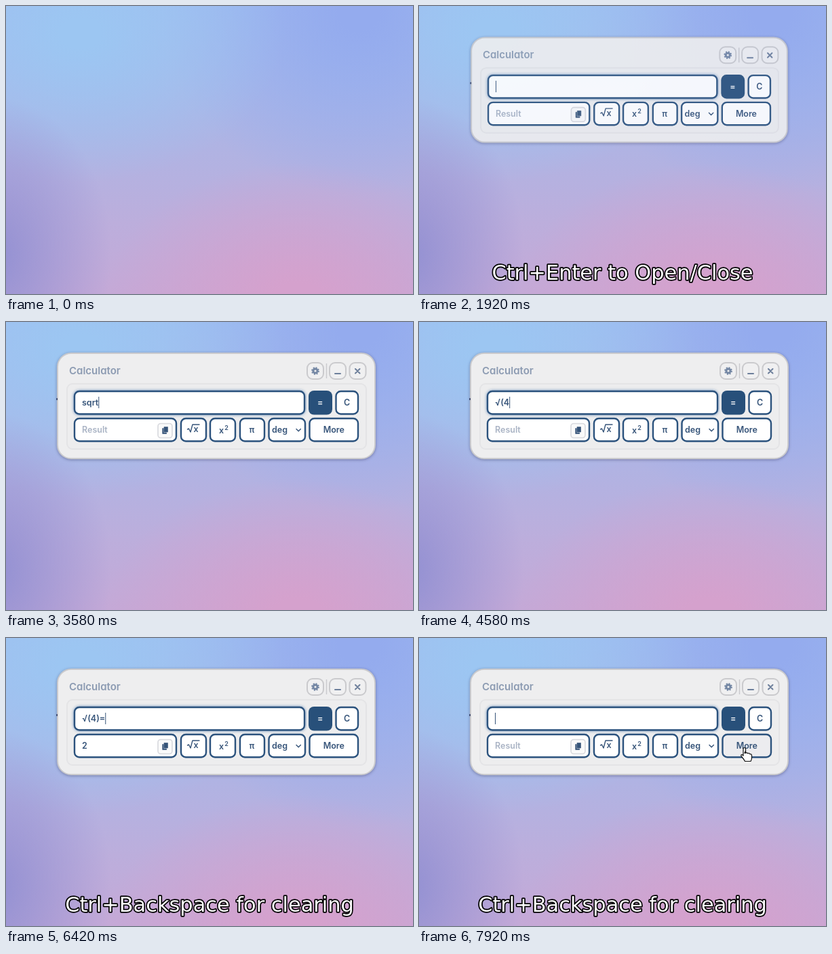
An HTML page that plays this animation: 600 px wide and 424 px high, repeating every 8000 ms.

```html
<!DOCTYPE html>
<html lang="en">
<head>
<meta charset="utf-8">
<title>Calculator</title>
<style>
html, body { margin: 0; width: 100%; height: 100%; overflow: hidden; }
body {
  background:
    radial-gradient(ellipse 290px 210px at 430px 440px, #d5a1cd 15%, #d5a1cd00),
    radial-gradient(ellipse 170px 230px at -15px 365px, #9793d3 10%, #9793d300),
    radial-gradient(ellipse 300px 220px at 110px 40px, #9cc6f2 10%, #9cc6f200),
    radial-gradient(ellipse 290px 270px at 520px 10px, #94abee 10%, #94abee00),
    linear-gradient(#a0bcef, #aeb4e4 45%, #bcaedc 75%, #c4a9d7);
}
svg { display: block; width: 100%; height: 100%; }
text { font-family: Inter, "Open Sans", sans-serif; font-feature-settings: "cv11"; font-weight: 600; font-size: 12.5px; fill: #365479; }
.mid { text-anchor: middle; }
.caption { font: 30.4px "DejaVu Sans", sans-serif; fill: #fff; stroke: #000; stroke-width: 3.4px; stroke-linejoin: round; paint-order: stroke; text-anchor: middle; }
.icon { fill: none; stroke: #6d7f9b; stroke-width: 2; stroke-linecap: round; stroke-linejoin: round; }
.dark { stroke: #365479; stroke-width: 1.4; }
#panel { transform-origin: 310px 123px; }
#frame { filter: drop-shadow(0 1px 2px rgba(50, 50, 90, .45)); }
#field { filter: drop-shadow(0 0 2px rgba(60, 110, 170, .75)); }
</style>
</head>
<body>
<svg id="stage" viewBox="0 0 600 424" preserveAspectRatio="none"></svg>
<script>
const LOOP = 8000, BLINK = 1060;
const NAVY = '#2b527d', EDGE = '#cacacd';

const box = (x, y, w, h, r, fill, stroke = 'none', width = 2, id = '') =>
  `<rect id="${id}" x="${x}" y="${y}" width="${w}" height="${h}" rx="${r}" fill="${fill}" stroke="${stroke}" stroke-width="${width}"/>`;
const label = (x, y, text, attrs = 'class="mid"') => `<text x="${x}" y="${y}" ${attrs}>${text}</text>`;
const icon = (d, cls = '') => `<path class="icon ${cls}" d="${d}"/>`;

const keys = [
  { id: 'root', x: 258, w: 37 },
  { id: 'square', x: 301, w: 37 },
  { id: 'pi', x: 345, w: 36 },
  { id: 'unit', x: 387.5, w: 53.5 },
  { id: 'more', x: 447.5, w: 71.5 }
];

stage.innerHTML = `
<g id="panel">
  <g id="frame">${box(76, 46, 468, 155, 20, '#eeeeef', EDGE)}</g>
  ${box(90, 91, 441, 96, 8, '#ededee', '#e4e4e6')}
  <rect x="74" y="112" width="2" height="3" fill="#4b587b"/>
  ${label(93, 76.5, 'Calculator', 'style="font-size:15px;fill:#8c9bb2"')}
  ${[444, 477, 506.5].map(x => box(x, 60, 24, 24, 8, '#f0f0f1', EDGE)).join('')}
  <path d="M472.5 61V83" stroke="${EDGE}" stroke-width="1.5"/>
  <circle cx="456" cy="72" r="3.1" fill="none" stroke="#7487a4" stroke-width="3"/>
  <circle cx="456" cy="72" r="5" fill="none" stroke="#7487a4" stroke-width="1.8" stroke-dasharray="2 1.927"/>
  ${icon('M485 76H493')}${icon('M515 69l6.5 6.5M521.5 69l-6.5 6.5')}
  ${box(101, 102, 339, 33.5, 7, '#fff', NAVY, 2.4, 'field')}
  ${label(112, 122.5, '', 'id="entry" xml:space="preserve"')}
  <rect id="caret" y="110" width="1" height="17" fill="#365479"/>
  ${box(446, 101, 35, 35.5, 8, '#28507a')}
  ${label(463.3, 123, '=', 'class="mid" style="fill:#fff"')}
  ${box(486.5, 102, 32.5, 33.5, 7, '#fff', NAVY, 2.4)}
  ${label(502.7, 123, 'C')}
  ${box(101, 142, 150, 33.5, 7, '#fff', NAVY, 2.4)}
  ${label(112, 163, '', 'id="result"')}
  ${box(224, 149.5, 21, 21, 4, '#fafafa', '#d8d9de', 1.6)}
  <path d="M233 154.5h5.5v7.5h-5.5zM230.7 156.500h1.500v6.500h4.500v1.500h-6z" fill="#365479" stroke="#365479" stroke-width=".6"/>
  ${keys.map(k => box(k.x, 142, k.w, 33.5, 7, '#fff', NAVY, 2.4, k.id)).join('')}
  ${icon('M267.500 158l2-1 2.500 5 3-11h10', 'dark')}
  ${label(280, 162, 'x')}
  ${label(317.500, 163.500, 'x')}
  ${label(325, 158.500, '2', 'class="mid" style="font-size:9px"')}
  ${label(362.500, 163, 'π')}
  ${label(392, 163, 'deg', '')}
  ${icon('M428 157.500l3.200 3.200 3.200-3.200', 'dark')}
  ${label(483.300, 163, 'More')}
</g>
<g id="tip">${box(384.500, 175.500, 20.500, 25, 4, '#5d5c62')}${label(394.700, 191.500, 'pi', 'class="mid" style="font-size:11px;fill:#fff"')}</g>
<path id="hand" fill="#fff" stroke="#111" stroke-width="1.2" stroke-linejoin="round"
  d="M-2 .500Q-2-1.500-.300-1.500Q1.500-1.500 1.500.500V6.500Q2-.0 0 6.500Q3.500 5 4.700 7Q7 6 7.800 8Q10.500 7.400 10.500 10V13.500Q10.500 15.500 9 18.500H.500Q-1 15.500-4.500 11.500Q-6 9.300-4.400 8.700Q-3.200 8.500-2 10.300Z"/>
<text id="caption" class="caption" x="300" y="402.500"></text>`;

// Time, entry text, result
const typing = [
  [1750, '', ''], [3080, 's', ''], [3220, 'sq', ''], [3350, 'sqr', ''], [3500, 'sqrt', ''],
  [3920, '√(', ''], [4420, '√(4', ''], [4830, '√(4)', ''], [5250, '√(4)=', '2'], [6600, '', '']
];
const captions = [
  [0, ''], [1000, 'Ctrl+Enter to Open/Close'], [3000, ''], [6080, 'Ctrl+Backspace for clearing']
];
// Time, x, y of the pointer tip
const route = [
  [6670, 262, 215], [6830, 278, 164], [7000, 320, 163], [7170, 368, 163], [7250, 409, 163], [7460, 480, 163]
];

const current = (table, t) => table.findLast(row => row[0] <= t) || table[0];
const show = (el, on) => el.setAttribute('visibility', on ? 'visible' : 'hidden');
const byId = id => document.getElementById(id);
const [panel, entry, caret, result, tip, hand, caption] =
  ['panel', 'entry', 'caret', 'result', 'tip', 'hand', 'caption'].map(byId);

function pointerAt(t) {
  const next = route.findIndex(p => p[0] > t);
  if (next === 0) return null;
  if (next < 0) return route.at(-1).slice(1);
  const a = route[next - 1], b = route[next], f = (t - a[0]) / (b[0] - a[0]);
  return [a[1] + (b[1] - a[1]) * f, a[2] + (b[2] - a[2]) * f];
}

function draw(t) {
  const p = Math.min(1, Math.max(0, (t - 1750) / 250));
  const open = 1 - (1 - p) ** 2;
  panel.style.opacity = open;
  panel.style.transform = `scale(${0.95 + 0.05 * open})`;

  const [since, text, value] = current(typing, t);
  entry.textContent = text;
  result.textContent = value || 'Result';
  result.style.fill = value ? '#365479' : '#a9b3c4';
  caret.setAttribute('x', 112 + (text ? entry.getComputedTextLength() : 0));
  show(caret, t >= since && (t - since) % BLINK < BLINK / 2);

  caption.textContent = current(captions, t)[1];

  const tipPoint = pointerAt(t);
  show(hand, tipPoint);
  if (tipPoint) hand.setAttribute('transform', `translate(${tipPoint})`);

  // Hover feedback trails the pointer slightly
  const trail = pointerAt(t - 90);
  const over = trail && trail[1] < 176 && keys.find(k => trail[0] >= k.x && trail[0] <= k.x + k.w);
  for (const k of keys) byId(k.id).setAttribute('fill', k === over ? '#ececef' : '#fff');
  show(tip, over && over.id === 'pi');
}

const start = performance.now();
function tick() {
  draw((performance.now() - start) % LOOP);
  requestAnimationFrame(tick);
}
tick();
</script>
</body>
</html>
```
